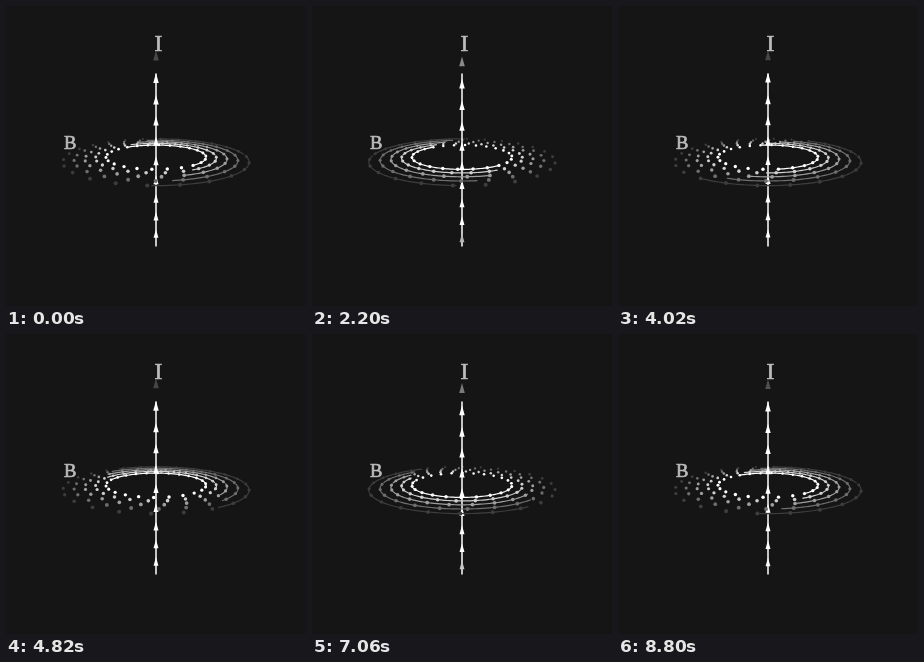
These frames come from a looping animation (300 by 300 pixels, 8.82 s). An HTML page with a canvas:

```html
<!DOCTYPE html>
<html lang="en">
<head>
<meta charset="utf-8">
<title>Field around a current</title>
<style>
  html, body { margin: 0; width: 100%; height: 100%; overflow: hidden; background: #151515; }
  canvas { display: block; width: 300px; height: 300px; }
</style>
</head>
<body>
<canvas id="stage" width="300" height="300"></canvas>
<script>
const LOOP = 8820;
const RINGS = 5, DOTS = 24;
const CX = 150, RING_Y = 149.2, WIRE_Y = 150;
const WIDE = 296, DEEP = 71;      // horizontal and foreshortened scale
const GAP = 0.0697;               // arrow spacing along the wire
const rad = deg => deg * Math.PI / 180;
const clamp = v => Math.max(0, Math.min(1, v));
const ctx = document.getElementById('stage').getContext('2d');

const gray = a => {
  const v = Math.round(21 + 234 * a);
  return `rgb(${v},${v},${v})`;
};

// Angles start at the viewer and run counterclockwise seen from above.
function ringPoint(size, deg) {
  const depth = Math.cos(rad(deg));
  const scale = 1 / (1 - size * depth);
  return {
    x: CX + WIDE * size * Math.sin(rad(deg)) * scale,
    y: RING_Y + DEEP * size * depth * scale,
    scale,
    front: depth > 0
  };
}

const wireScale = h => 1 / (1 - 0.23 * h);
const wireY = h => WIRE_Y - 280 * h * wireScale(h);

function drawRing(i, turn, front) {
  const size = (1 + 0.2 * i) / 6;
  const start = 41 - 10.8 * i + 720 * turn;
  ctx.strokeStyle = ctx.fillStyle = gray(1 - 0.207 * i);
  ctx.lineWidth = 1.2;
  ctx.beginPath();
  let open = false;
  for (let d = 0; d <= 180; d += 2) {
    const p = ringPoint(size, start + d);
    if (p.front !== front) { open = false; continue; }
    if (open) ctx.lineTo(p.x, p.y);
    else ctx.moveTo(p.x, p.y);
    open = true;
  }
  ctx.stroke();

  for (let k = 0; k < DOTS; k++) {
    const p = ringPoint(size, 11 - 3.75 * i + 360 * (turn + k / DOTS));
    if (p.front !== front) continue;
    ctx.beginPath();
    ctx.arc(p.x, p.y, 1.45 * p.scale, 0, 2 * Math.PI);
    ctx.fill();
  }
}

function drawWire(turn) {
  ctx.strokeStyle = '#fff';
  ctx.lineWidth = 1.5;
  ctx.beginPath();
  ctx.moveTo(CX, 67.5);
  ctx.lineTo(CX, 240.5);
  ctx.stroke();

  const phase = turn * 11 % 1;
  for (let k = 0; k <= 10; k++) {
    const step = k + phase;
    const h = -0.367 + GAP * step;
    const alpha = Math.min(clamp((step - 0.2) * 1.25), clamp((10.2 - step) * 1.1));
    if (!alpha) continue;
    const y = wireY(h), s = wireScale(h);
    ctx.fillStyle = gray(alpha);
    ctx.beginPath();
    ctx.moveTo(CX, y - 5 * s);
    ctx.lineTo(CX + 2.6 * s, y + 4.2 * s);
    ctx.lineTo(CX - 2.6 * s, y + 4.2 * s);
    ctx.fill();
  }
}

function drawLabel(text, x, y, size) {
  ctx.font = `${size}px "Liberation Serif", serif`;
  ctx.textAlign = 'center';
  ctx.fillStyle = ctx.strokeStyle = '#bcbcbc';
  ctx.lineWidth = 0.7;
  ctx.fillText(text, x, y);
  ctx.strokeText(text, x, y);
}

function draw(ms) {
  const turn = ms % LOOP / LOOP;
  ctx.fillStyle = '#151515';
  ctx.fillRect(0, 0, 300, 300);
  for (let i = RINGS - 1; i >= 0; i--) drawRing(i, turn, false);
  drawWire(turn);
  for (let i = 0; i < RINGS; i++) drawRing(i, turn, true);
  drawLabel('I', 152.3, 45.4, 23.5);
  drawLabel('B', 64.2, 142.6, 18.5);
}

const began = performance.now();
function tick() {
  draw(performance.now() - began);
  requestAnimationFrame(tick);
}
tick();
</script>
</body>
</html>
```
